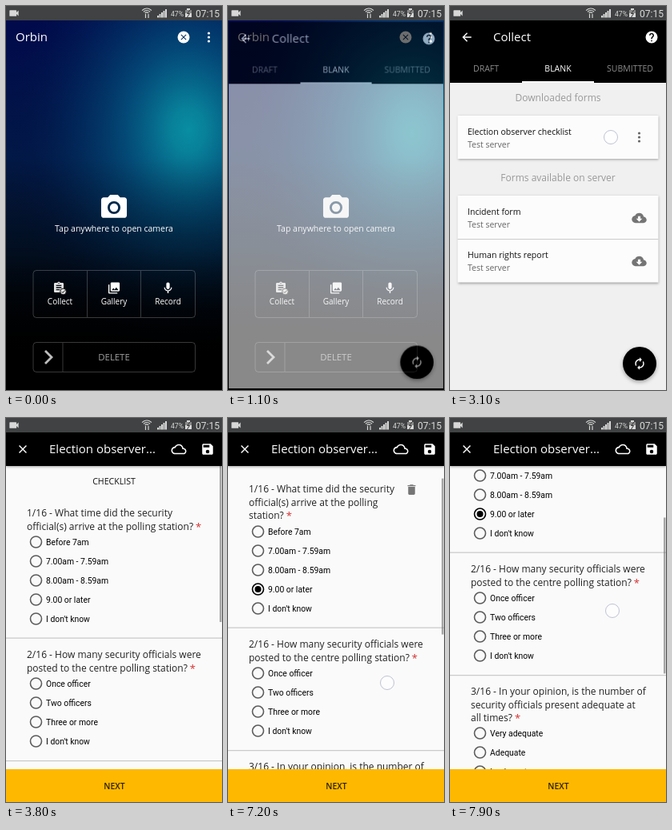
These frames come from a looping animation (270x480 px, 8 s). An HTML page with a canvas:

```html
<!DOCTYPE html>
<html lang="en">
<head>
<meta charset="utf-8">
<title>Form checklist on a phone</title>
<style>
html, body { margin: 0; width: 100%; height: 100%; overflow: hidden; background: #000 }
canvas { display: block; width: 270px; height: 480px }
</style>
</head>
<body>
<canvas id="stage"></canvas>
<script>
const W = 270, H = 480, LOOP = 8000, STEP = 100;
const OPEN = '"Open Sans", sans-serif', ROBOTO = 'Roboto, sans-serif';
const dpr = window.devicePixelRatio || 1;
const CLOUD = 'M19.35 10.04C18.67 6.59 15.64 4 12 4 9.11 4 6.6 5.64 5.35 8.04 2.34 8.36 0 10.91 0 14c0 3.31 2.69 6 6 6h13c2.76 0 5-2.24 5-5 0-2.64-2.05-4.78-4.65-4.96z';

// Icons on a 24-unit grid
const ICONS = {
  back: 'M20 11H7.83l5.59-5.59L12 4l-8 8 8 8 1.41-1.41L7.83 13H20v-2z',
  close: 'M19 6.41L17.59 5 12 10.59 6.41 5 5 6.41 10.59 12 5 17.59 6.41 19 12 13.41 17.59 19 19 17.59 13.41 12z',
  help: 'M12 2a10 10 0 1 0 0 20 10 10 0 1 0 0-20zm1 17h-2v-2h2v2zm2.07-7.75l-.9.92C13.45 12.9 13 13.5 13 15h-2v-.5c0-1.1.45-2.1 1.17-2.83l1.24-1.26c.37-.36.59-.86.59-1.41 0-1.1-.9-2-2-2s-2 .9-2 2H8c0-2.21 1.79-4 4-4s4 1.79 4 4c0 .88-.36 1.68-.93 2.25z',
  camera: 'M12 8.8a3.2 3.2 0 1 0 0 6.4 3.2 3.2 0 1 0 0-6.4zM9 2L7.17 4H4c-1.1 0-2 .9-2 2v12c0 1.1.9 2 2 2h16c1.1 0 2-.9 2-2V6c0-1.1-.9-2-2-2h-3.17L15 2H9zm3 15a5 5 0 1 1 0-10 5 5 0 1 1 0 10z',
  save: 'M17 3H5c-1.11 0-2 .9-2 2v14c0 1.1.89 2 2 2h14c1.1 0 2-.9 2-2V7l-4-4zm-5 16a3 3 0 1 1 0-6 3 3 0 1 1 0 6zm3-10H5V5h10v4z',
  cloud: CLOUD + 'M19 18H6c-2.21 0-4-1.79-4-4s1.79-4 4-4h.71C7.37 7.69 9.48 6 12 6c3.04 0 5.5 2.46 5.5 5.5v.5H19c1.66 0 3 1.34 3 3s-1.34 3-3 3z',
  download: CLOUD + 'M17 13l-5 5-5-5h3V9h4v4h3z',
  trash: 'M6 19c0 1.1.9 2 2 2h8c1.1 0 2-.9 2-2V7H6v12zM19 4h-3.5l-1-1h-5l-1 1H5v2h14V4z',
  sync: 'M12 6v3l4-4-4-4v3c-4.42 0-8 3.58-8 8 0 1.57.46 3.03 1.24 4.26L6.7 14.8c-.45-.83-.7-1.79-.7-2.8 0-3.31 2.69-6 6-6zm6.76 1.74L17.3 9.2c.44.84.7 1.79.7 2.8 0 3.31-2.69 6-6 6v-3l-4 4 4 4v-3c4.42 0 8-3.58 8-8 0-1.57-.46-3.03-1.24-4.26z',
  mic: 'M12 14c1.66 0 3-1.34 3-3V5c0-1.66-1.34-3-3-3S9 3.34 9 5v6c0 1.66 1.34 3 3 3zm5.3-3c0 3-2.54 5.1-5.3 5.1S6.7 14 6.7 11H5c0 3.41 2.72 6.23 6 6.72V21h2v-3.28c3.28-.48 6-3.3 6-6.72h-1.7z',
  gallery: 'M22 16V4c0-1.1-.9-2-2-2H8c-1.1 0-2 .9-2 2v12c0 1.1.9 2 2 2h12c1.1 0 2-.9 2-2zm-11-4l2.03 2.71L16 11l4 5H8l3-4zM2 6v14c0 1.1.9 2 2 2h14v-2H4V6H2z',
  clipboard: 'M19 3h-4.18C14.4 1.84 13.3 1 12 1c-1.3 0-2.4.84-2.82 2H5c-1.1 0-2 .9-2 2v14c0 1.1.9 2 2 2h14c1.1 0 2-.9 2-2V5c0-1.1-.9-2-2-2zm-7 0a1 1 0 1 1 0 2 1 1 0 1 1 0-2zm2 14H7v-2h7v2zm3-4H7v-2h10v2zm0-4H7V7h10v2z',
  video: 'M17 10.5V7c0-.55-.45-1-1-1H4c-.55 0-1 .45-1 1v10c0 .55.45 1 1 1h12c.55 0 1-.45 1-1v-3.5l4 4v-11l-4 4z'
};
for (const k in ICONS) ICONS[k] = new Path2D(ICONS[k]);

function makeContext(canvas) {
  canvas.width = W * dpr;
  canvas.height = H * dpr;
  const ctx = canvas.getContext('2d');
  ctx.scale(dpr, dpr);
  return ctx;
}
const main = makeContext(document.getElementById('stage'));
const layer = makeContext(document.createElement('canvas'));
let c = main;

const clamp = v => Math.max(0, Math.min(1, v));

function rect(x, y, w, h, fill) {
  c.fillStyle = fill;
  c.fillRect(x, y, w, h);
}

// y is the middle of the capital letters
function text(s, x, y, size, color, align = 'left', font = OPEN, weight = 400) {
  c.font = `${weight} ${size}px ${font}`;
  c.textAlign = align;
  c.fillStyle = color;
  c.fillText(s, x, y + size * .357);
  return c.measureText(s).width;
}

function icon(name, x, y, size, color) {
  c.save();
  c.translate(x - size / 2, y - size / 2);
  c.scale(size / 24, size / 24);
  c.fillStyle = color;
  c.fill(ICONS[name], 'evenodd');
  c.restore();
}

function circle(x, y, r, fill, stroke, width = 1) {
  c.beginPath();
  c.arc(x, y, r, 0, 7);
  if (fill) { c.fillStyle = fill; c.fill(); }
  if (stroke) { c.strokeStyle = stroke; c.lineWidth = width; c.stroke(); }
}

function line(points, color, width) {
  c.beginPath();
  points.forEach(([x, y]) => c.lineTo(x, y));
  c.strokeStyle = color;
  c.lineWidth = width;
  c.stroke();
}

function frameBox(x, y, w, h, color) {
  c.beginPath();
  c.roundRect(x, y, w, h, 4);
  c.strokeStyle = color;
  c.lineWidth = 1;
  c.stroke();
}

function shadowed(blur, dy, draw) {
  c.save();
  c.shadowColor = 'rgba(0,0,0,.35)';
  c.shadowBlur = blur * dpr;
  c.shadowOffsetY = dy * dpr;
  draw();
  c.restore();
}

function dots(x, y, gap, color) {
  for (const d of [-gap, 0, gap]) circle(x, y + d, 1.6, color);
}

function touch(x, y) {
  circle(x, y, 8.5, 'rgba(255,255,255,.55)', 'rgba(150,155,185,.6)');
}

function statusBar() {
  const ink = '#d8d8d8';
  rect(0, 0, W, 18, '#404243');
  icon('video', 10, 9, 15, ink);
  for (const r of [3, 5.5, 8]) {
    c.beginPath();
    c.arc(176, 11, r, -2.4, -.75);
    c.strokeStyle = ink;
    c.lineWidth = 1.2;
    c.stroke();
  }
  line([[174.5, 10], [174.5, 15]], ink, 1.2);
  line([[178, 10], [178, 15]], ink, 1.2);
  for (let i = 0; i < 5; i++) rect(189 + i * 2.5, 12 - i * 2, 2, 2.5 + i * 2, ink);
  text('47%', 206, 9.5, 8.6, ink, 'left', ROBOTO);
  rect(226, 3, 4, 2, ink);
  rect(224, 5, 8, 4, '#8a8a8a');
  rect(224, 9, 8, 5, ink);
  line([[230, 5], [226.5, 9.5], [229.5, 9.5], [226.5, 14]], '#333', 1);
  text('07:15', 267, 9.5, 12.1, ink, 'right', ROBOTO);
}

// Soft light stretched downwards over a navy sky that sinks to black
function backdrop(t) {
  const drift = Math.min(t, 1000) / 1000;
  const sky = c.createLinearGradient(0, 18, 0, 440);
  [[0, '#010a4c'], [.4, '#021846'], [.7, '#03152e'], [1, '#000']].forEach(s => sky.addColorStop(...s));
  rect(0, 18, W, H - 18, sky);
  c.save();
  c.beginPath();
  c.rect(0, 18, W, H - 18);
  c.clip();
  c.translate(228 + 2 * drift, 155 + 4 * drift);
  c.scale(1, 1.3);
  const glow = c.createRadialGradient(0, 0, 0, 0, 0, 225);
  [[0, 'rgba(8,142,162,1)'], [.1, 'rgba(8,132,157,.96)'], [.35, 'rgba(4,88,132,.78)'],
   [.65, 'rgba(2,56,106,.42)'], [1, 'rgba(0,14,66,0)']].forEach(s => glow.addColorStop(...s));
  circle(0, 0, 225, glow);
  c.restore();
  const floor = c.createLinearGradient(0, 190, 0, 440);
  [[0, 'rgba(0,0,0,0)'], [.45, 'rgba(0,0,0,.32)'], [.75, 'rgba(0,0,0,.75)'], [1, '#000']]
    .forEach(s => floor.addColorStop(...s));
  rect(0, 190, W, H - 190, floor);
}

function home(t) {
  backdrop(t);
  text('Orbin', 12, 39, 15, '#fff');
  circle(222, 39, 7.5, '#fff');
  icon('close', 222, 39, 12, '#04305e');
  dots(253.5, 39, 5, '#fff');
  icon('camera', 135, 252, 38.5, '#fff');
  text('Tap anywhere to open camera', 135, 278, 10.5, '#fff', 'center');

  const edge = 'rgba(255,255,255,.22)';
  frameBox(34, 330.5, 202.5, 59, edge);
  for (const x of [101.5, 168.5]) line([[x, 331], [x, 389]], edge, 1);
  icon('clipboard', 66, 352, 16, '#e4e4e4');
  circle(71.5, 357, 3.8, '#e4e4e4', '#111');
  line([[69.5, 357], [71, 358.5], [73.5, 355.5]], '#111', 1);
  icon('gallery', 135, 352.5, 17, '#fff');
  icon('mic', 202.5, 352.5, 17, '#fff');
  ['Collect', 'Gallery', 'Record'].forEach((s, i) => text(s, 67.5 + i * 67.5, 369.5, 10, '#fff', 'center'));

  frameBox(34, 420.5, 202.5, 37, edge);
  line([[71, 421], [71, 457]], edge, 1);
  line([[49, 431], [57, 439], [49, 447]], '#bdbdbd', 2.8);
  text('DELETE', 135, 439, 11.4, '#a0a0a0', 'center');
}

function card(y, h) {
  shadowed(3, 1, () => rect(9.5, y, 251, h, '#fcfcfc'));
}

function formRow(title, y) {
  text(title, 22, y, 10.55, '#111');
  text('Test server', 22, y + 16, 10.5, '#666');
}

function collect(t) {
  rect(0, 18, W, H - 18, '#f0f0f1');
  rect(0, 18, W, 78, '#000');
  icon('back', 21, 39, 17, '#fff');
  text('Collect', 54, 39, 15, '#fff');
  icon('help', 252, 39, 18, '#fff');
  text('DRAFT', 45, 78, 10.5, '#8c8c8c', 'center');
  text('BLANK', 135, 78, 10.5, '#fff', 'center');
  text('SUBMITTED', 225, 78, 10.5, '#8c8c8c', 'center');
  rect(90, 94, 90, 2, '#fff');
  if (t >= 1300) {
    text('Downloaded forms', 135, 115, 12, '#999', 'center');
    card(137, 54);
    formRow('Election observer checklist', 157);
    dots(236.5, 164, 5, '#666');
    text('Forms available on server', 135, 215, 12, '#999', 'center');
    card(237, 108.5);
    rect(9.5, 291, 251, 1, '#ccc');
    formRow('Incident form', 257.5);
    formRow('Human rights report', 311.5);
    for (const y of [265, 319]) icon('download', 236.5, y, 18.5, '#757575');
  }
  shadowed(5, 2, () => circle(237, 447, 21, '#000'));
  icon('sync', 237, 447, 17, '#fff');
}

function question(lines, y) {
  let w;
  lines.forEach((s, i) => w = text(s, 26, y + i * 16.3, 12, '#222'));
  text('*', 26 + w + 3, y + (lines.length - 1) * 16.3 + 1, 13, '#d32f2f');
}

function options(labels, y, chosen = -1) {
  labels.forEach((s, i) => {
    const cy = y + i * 24, on = i === chosen;
    circle(37.5, cy, 7, null, on ? '#000' : '#5c5c5c', 1.6);
    if (on) circle(37.5, cy, 4, '#000');
    text(s, 50, cy + .5, 10.4, '#000', 'left', ROBOTO);
  });
}

function form(t) {
  const picked = t >= 6500;
  const scroll = Math.max(0, t - 6977) * .1343;
  const shift = picked ? 17 : 0;
  rect(0, 18, W, H - 18, '#fafafa');

  c.save();
  c.beginPath();
  c.rect(0, 60, W, 379);
  c.clip();
  c.translate(0, -scroll);
  text('CHECKLIST', 135, 79, 10.6, '#111', 'center');
  question(picked
    ? ['1/16 - What time did the security', 'official(s) arrive at the polling', 'station?']
    : ['1/16 - What time did the security', 'official(s) arrive at the polling station?'], 119);
  if (picked) icon('trash', 229.5, 119.5, 17, '#757575');
  c.translate(0, shift);
  if (picked && t < 6800) circle(37.5, 227, 14.5, 'rgba(0,0,0,.12)');
  options(['Before 7am', '7.00am - 7.59am', '8.00am - 8.59am', '9.00 or later', "I don't know"], 155, picked ? 3 : -1);
  rect(0, 274.5, W, 1.2, '#c8c8c8');
  question(['2/16 - How many security officials were', 'posted to the centre polling station?'], 296);
  options(['Once officer', 'Two officers', 'Three or more', "I don't know"], 332);
  rect(0, 428, W, 1.2, '#c8c8c8');
  question(['3/16 - In your opinion, is the number of', 'security officials present adequate at', 'all times?'], 449);
  options(['Very adequate', 'Adequate', 'Inadequate'], 501);
  c.restore();

  const bar = t < 6900 ? 1 - clamp((t - 4900) / 500) : 1;
  rect(267, 60 + scroll * .52, 2.5, 195, `rgba(110,110,110,${.6 * bar})`);

  shadowed(3, 1, () => rect(0, 18, W, 42, '#000'));
  icon('close', 21, 39, 17, '#fff');
  text('Election observer...', 54, 39, 15, '#fff');
  icon('cloud', 216, 39, 19, '#fff');
  icon('save', 252, 39, 18, '#fff');
  rect(0, 439, W, 41, '#ffb800');
  text('NEXT', 135.5, 460, 10.4, '#2a2000', 'center', OPEN, 600);

  if (t >= 6300 && t < 6500) touch(91, 232);
  if (t >= 7000) touch(199 + (t - 7200) * .0057, 331 - (t - 7200) * .1286);
}

// Fades and grows a page in over whatever is already drawn
function enter(page, t, start, span) {
  const p = clamp((t - start) / span);
  if (!p) return;
  c = layer;
  c.clearRect(0, 0, W, H);
  page(t);
  c = main;
  const k = .98 + .02 * p;
  c.save();
  c.globalAlpha = p;
  c.translate(135, 249);
  c.scale(k, k);
  c.translate(-135, -249);
  c.drawImage(layer.canvas, 0, 0, W, H);
  c.restore();
}

function draw(t) {
  if (t < 1300) home(t);
  if (t < 3800) {
    enter(collect, t, 900, 350);
    if (t >= 3100 && t < 3400) touch(201, 164);
  }
  enter(form, t, 3500, 300);
  statusBar();
}

const began = performance.now();
function tick() {
  const t = (performance.now() - began) % LOOP;
  draw(Math.floor(t / STEP) * STEP);
  requestAnimationFrame(tick);
}
tick();
</script>
</body>
</html>
```
